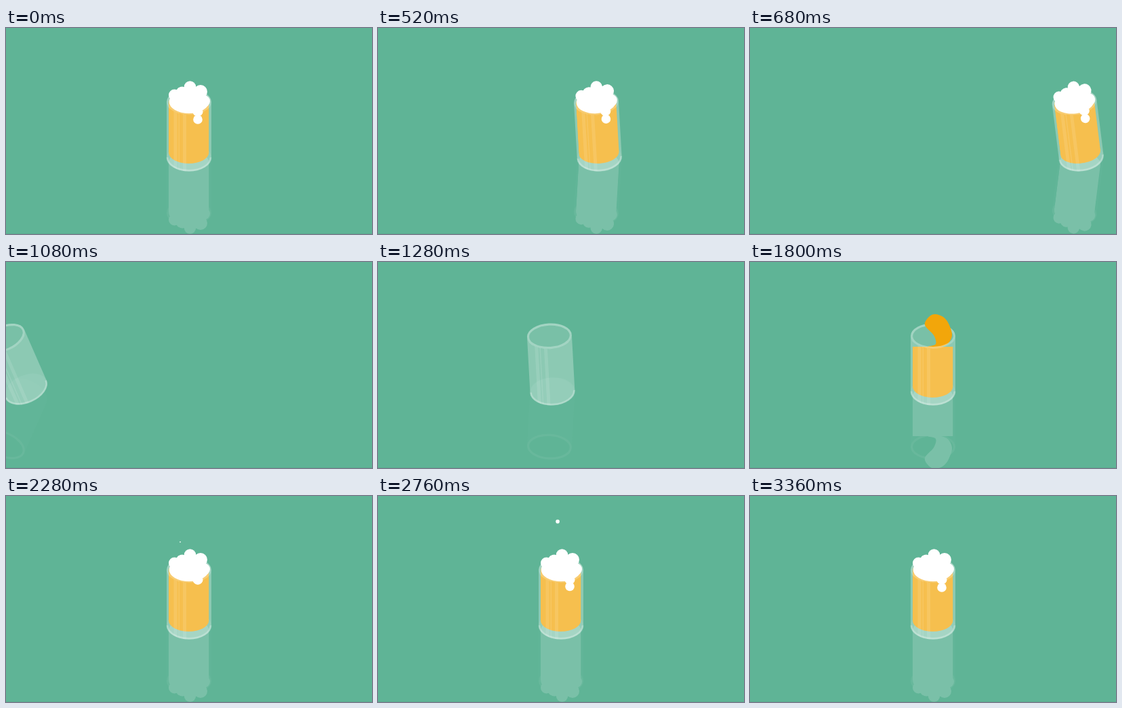
Animation of 540x304 px, one loop 3520 ms. Source, as an HTML page:

```html
<!DOCTYPE html>
<html lang="en">
<head>
<meta charset="utf-8">
<title>Pouring a beer</title>
<style>
  html, body { margin: 0; width: 100%; height: 100%; overflow: hidden; background: #5fb496; }
  svg { display: block; width: 100vw; height: 100vh; }
</style>
</head>
<body>
<svg viewBox="0 0 540 304">
  <defs>
    <clipPath id="inside"><path d="M240 80H299.3V184A29.65 16 0 0 1 240 184Z"/></clipPath>
    <path id="wall" d="M237 109.3A33 18.8 0 0 0 303 109.3V191A33 20.5 0 0 1 237 191Z"/>
    <clipPath id="wallClip"><use href="#wall"/></clipPath>
    <g id="liquid">
      <path id="fill" clip-path="url(#inside)"/>
      <path id="stream"/>
      <path id="splash"/>
    </g>
    <g id="foam"></g>
  </defs>
  <rect width="540" height="304" fill="#5fb496"/>
  <rect y="303" width="540" height="1" fill="#5aab8e"/>

  <!-- reflection -->
  <g transform="matrix(1 0 0 -1 0 382)" opacity=".17">
    <g class="lean" fill="#fff">
      <use href="#wall" opacity=".1"/>
      <ellipse cx="270" cy="109.3" rx="31.4" ry="17.2" fill="none" stroke="#fff" stroke-width="3.2" opacity=".33"/>
      <use href="#liquid"/>
      <use href="#foam"/>
    </g>
  </g>

  <!-- glass -->
  <g class="lean" fill="#fff">
    <ellipse cx="270" cy="109.3" rx="29.8" ry="15.6" opacity=".16"/>
    <path d="M238.6 109.3A31.4 17.2 0 0 1 301.4 109.3" fill="none" stroke="#fff" stroke-width="3.2" opacity=".42"/>
    <ellipse cx="270" cy="191" rx="33" ry="20.5" opacity=".06"/>
    <use href="#liquid" fill="#f2a60a"/>
    <use href="#wall" opacity=".28"/>
    <g clip-path="url(#wallClip)" opacity=".11">
      <rect x="247.5" y="100" width="5" height="112"/>
      <rect x="254.5" y="100" width="1.5" height="112"/>
      <rect x="261" y="100" width="5" height="112"/>
    </g>
    <path d="M238 191A32 19.3 0 0 0 302 191" fill="none" stroke="#fff" stroke-width="2.8" opacity=".25"/>
    <path d="M238.6 109.3A31.4 17.2 0 0 0 301.4 109.3" fill="none" stroke="#fff" stroke-width="3.2" opacity=".42"/>
    <use href="#foam"/>
  </g>
  <circle id="bubble" fill="#fff"/>
</svg>
<script>
const LOOP = 3520;
const $ = id => document.getElementById(id);
const clamp = v => Math.min(1, Math.max(0, v));
const span = (t, from, to) => clamp((t - from) / (to - from));
const smooth = u => u * u * (3 - 2 * u);
const backOut = u => 1 + 2.2 * (u - 1) ** 3 + 1.2 * (u - 1) ** 2;
const mix = (a, b, u) => a + (b - a) * u;

// cx, cy, rx, ry, start
const FOAM = [
  [270, 109, 29.5, 17, 2040],
  [260, 96, 9.5, 9.5, 2060],
  [274, 98, 14, 13, 2060],
  [248.5, 99, 8.5, 8.5, 2080],
  [287, 94, 10, 10, 2090],
  [271.5, 87, 8.7, 8.7, 2100],
  [292, 108, 9, 9, 2090],
  [283, 124, 7.5, 6.5, 2110],
  [283, 124, 6.8, 6.8, 2110]
];
const puffs = FOAM.map(([cx, cy]) => {
  const e = document.createElementNS('http://www.w3.org/2000/svg', 'ellipse');
  e.setAttribute('cx', cx);
  e.setAttribute('cy', cy);
  return $('foam').appendChild(e);
});
const drip = puffs[puffs.length - 1];

const SPLASH = [
  [258, 93], [264, 81], [273, 77], [285, 81], [293, 91], [298, 108],
  [290, 122], [270, 127], [262, 125], [274, 121], [271, 108]
];

// Closed Catmull-Rom curve
function closedCurve(pts) {
  const n = pts.length, at = i => pts[(i + n) % n];
  let d = `M${pts[0]}`;
  for (let i = 0; i < n; i++) {
    const [a, b, c, e] = [at(i - 1), at(i), at(i + 1), at(i + 2)];
    const h1 = b.map((v, k) => v + (c[k] - a[k]) / 6);
    const h2 = c.map((v, k) => v - (e[k] - b[k]) / 6);
    d += `C${h1} ${h2} ${c}`;
  }
  return d + 'Z';
}

// The glass tilts back around its centre in step with its speed
function drawLean(t) {
  let shift, angle;
  if (t < 920) {
    const u = Math.max(0, t - 330) / 190;
    shift = 53.7 * u ** 2.25;
    angle = -3.3 * u ** 1.25;
  } else {
    const u = Math.max(0, 1407 - t) / 127;
    shift = -15.2 * u ** 3;
    angle = -3.2 * u ** 2.12;
  }
  for (const g of document.querySelectorAll('.lean'))
    g.setAttribute('transform', `translate(${shift} 0) rotate(${angle} 270 150)`);
}

function drawLiquid(t) {
  const settle = smooth(span(t, 1800, 1980));
  const level = mix(mix(202, 125, span(t, 1510, 1780)), 110, settle);
  const w = t < 1800 ? 3 * Math.sin((t - 1500) / 300 * Math.PI * 2) : 0;
  $('fill').setAttribute('d', t < 1510 ? '' :
    `M239 ${level + w}C260 ${level - 3 * w} 280 ${level + 3 * w} 300 ${level - w}V205H239Z`);

  const head = Math.min(level - 4, mix(-20, 185, span(t, 1405, 1520) ** 1.3));
  $('stream').setAttribute('d', t > 1405 && t < 1720 && head > -15 ?
    `M258 -20H288V${head - 15}A15 15 0 0 1 258 ${head - 15}Z` : '');

  const lift = Math.max(0, 1800 - t) * 1.6;
  const pts = SPLASH.map(([x, y], i) => {
    const a = (205 + i * 360 / SPLASH.length) * Math.PI / 180;
    return [
      mix(x, 269.7 + 29.6 * Math.cos(a), settle),
      mix(i < 5 ? y - lift : y, 110 + 16.5 * Math.sin(a), settle)
    ];
  });
  $('splash').setAttribute('d', t < 1720 ? '' : closedCurve(pts));
}

function drawFoam(t) {
  FOAM.forEach(([, , rx, ry, start], i) => {
    const s = t < start ? 0 : Math.max(0, backOut(span(t, start, start + 160)));
    puffs[i].setAttribute('rx', rx * s);
    puffs[i].setAttribute('ry', ry * s);
  });
  drip.setAttribute('cy', mix(124, 135, smooth(span(t, 2300, 2900))));

  const left = (1 - span(t, 2280, 3200)) ** 4;
  const r = t < 2240 ? 0 : mix(0.6, 2.8, span(t, 2240, 2560)) * (1 - span(t, 3130, 3360));
  const bubble = $('bubble');
  bubble.setAttribute('cx', 265.5 - 8.5 * left);
  bubble.setAttribute('cy', 36 + 32 * left);
  bubble.setAttribute('r', r);
}

function draw(now) {
  const t = now % LOOP;
  const pour = t < 920 ? t + LOOP : t; // the full glass is the end of the previous pour
  drawLean(t);
  drawLiquid(pour);
  drawFoam(pour);
}

const begin = performance.now();
function tick() {
  draw(performance.now() - begin);
  requestAnimationFrame(tick);
}
tick();
</script>
</body>
</html>
```
